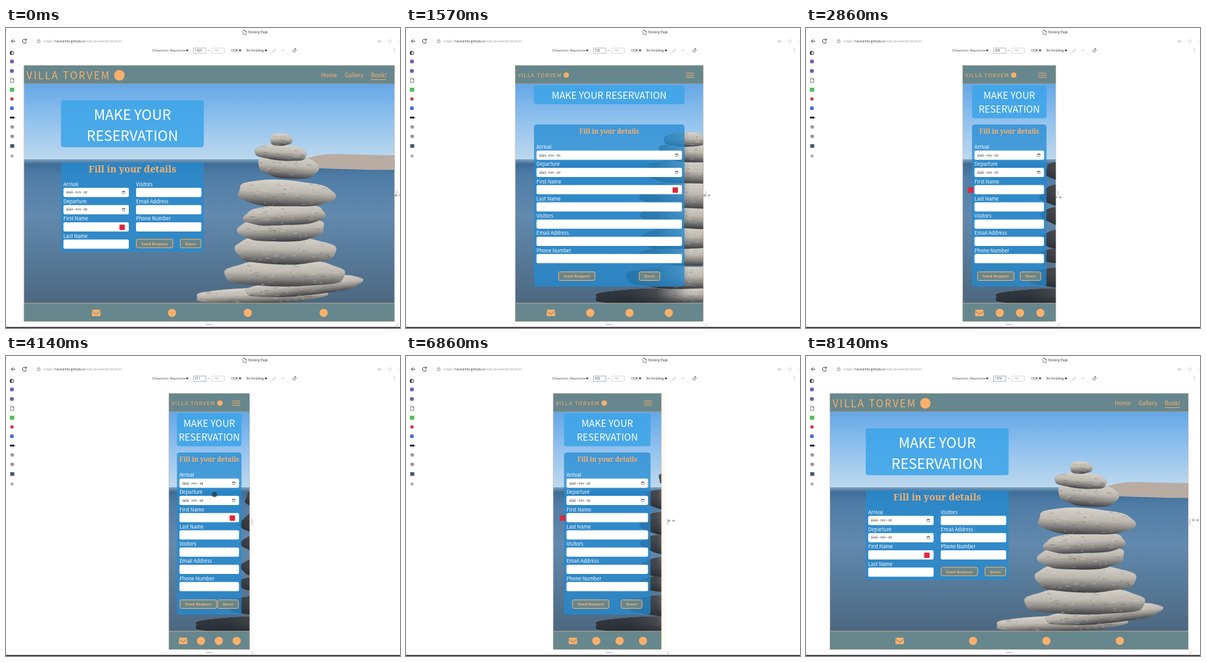
These frames come from a looping animation (600x457 px, 8280 ms). An HTML page with a canvas:

```html
<!DOCTYPE html>
<html lang="en">
<head>
<meta charset="utf-8">
<title>Booking Page</title>
<style>
  html, body { margin: 0; width: 100%; height: 100%; overflow: hidden; background: #fff; }
  canvas { display: block; width: 600px; height: 457px; }
</style>
</head>
<body>
<canvas id="stage" width="600" height="457"></canvas>
<script>
const ctx = document.getElementById('stage').getContext('2d');
const LOOP = 8280, SCALE = 0.395, TOP = 57, BOTTOM = 447;
const ORANGE = '#fdb069', SLATE = '#66878d', INK = '#333';
const SANS = '"Noto Sans CJK JP", "Noto Sans CJK", "Noto Sans", sans-serif';
const SLAB = '"Noto Serif", serif';
const UI = '"Open Sans", sans-serif';

// tick, viewport width, rendered page width, page centre, pointer x, pointer y
const KEYS = [
  [0, 1429, 1429, 309.5, 597, 255], [1, 1429, 1429, 309.5, 597, 255],
  [11, 725, 725, 309.5, 458, 255], [17, 430, 430, 309.5, 398, 257],
  [20, 359, 359, 309.5, 384, 258], [25, 311, 311, 309.5, 376, 256],
  [29, 311, 311, 309.5, 317.5, 211], [32, 311, 311, 309.5, 317.5, 211],
  [44, 311, 311, 309.5, 376, 252], [47, 311, 311, 309.5, 376, 252],
  [48, 433, 417, 306.5, 404, 251], [53, 1077, 1009, 309.3, 532, 250],
  [55, 1270, 1225, 309.3, 569, 250], [58, 1429, 1460, 309.3, 605, 250]
];

function pose(tick) {
  const i = KEYS.findIndex((k, n) => n && k[0] >= tick);
  const a = KEYS[i - 1], b = KEYS[i], f = (tick - a[0]) / (b[0] - a[0]);
  return a.map((v, n) => v + (b[n] - v) * f);
}

function rect(x, y, w, h, fill, radius = 0, stroke) {
  ctx.beginPath();
  ctx.roundRect(x, y, w, h, radius);
  if (fill) { ctx.fillStyle = fill; ctx.fill(); }
  if (stroke) { ctx.strokeStyle = stroke; ctx.stroke(); }
}
function dot(x, y, r, fill) {
  ctx.beginPath();
  ctx.arc(x, y, r, 0, 7);
  ctx.fillStyle = fill;
  ctx.fill();
}
function path(d, stroke, width = 0.8, fill) {
  const p = new Path2D(d);
  if (fill) { ctx.fillStyle = fill; ctx.fill(p); }
  if (stroke) { ctx.strokeStyle = stroke; ctx.lineWidth = width; ctx.stroke(p); ctx.lineWidth = 1; }
}
function text(str, x, y, size, color, { font = SANS, align = 'left', weight = 400, gap = 0 } = {}) {
  ctx.font = `${weight} ${size}px ${font}`;
  ctx.letterSpacing = gap + 'px';
  ctx.textAlign = align;
  ctx.fillStyle = color;
  ctx.fillText(str, x, y);
  const width = ctx.measureText(str).width;
  ctx.letterSpacing = '0px';
  return width;
}
function gradient(x0, y0, x1, y1, ...colors) {
  const g = ctx.createLinearGradient(x0, y0, x1, y1);
  colors.forEach(([at, c]) => g.addColorStop(at, c));
  return g;
}

// Stones from bottom to top: centre x, centre y, half width, half height, tilt
const WIDE_STACK = [
  [386, 408, 100, 12, -.03], [455, 394, 90, 13, -.1], [425, 374, 92, 20, 0], [424, 339, 77, 21, .02],
  [420, 307, 66, 18, -.03], [425, 285, 62, 16, -.05], [425, 252, 74, 20, .04], [430, 212, 46, 17, .08],
  [419, 190, 40, 12, .07], [419, 170, 17, 9.5, 0]
];
const NARROW_STACK = [
  [390, 408, 106, 12, -.03], [420, 380, 84, 17, 0], [430, 347, 74, 15, .02], [430, 320, 75, 16, -.03],
  [430, 288, 71, 17, .03], [425, 255, 67, 20, .02], [430, 220, 68, 17, .05],
  [430, 190, 45, 14, .06], [425, 170, 32, 11, 0]
];

function stone([x, y, rx, ry, tilt], seed, narrow) {
  const outline = new Path2D();
  for (let i = 0; i < 40; i++) {
    const a = i * Math.PI / 20, c = Math.cos(a), s = Math.sin(a);
    const bump = 1 + .035 * Math.sin(3 * a + seed * 2) + .025 * Math.sin(7 * a + seed);
    outline.lineTo(rx * bump * Math.sign(c) * Math.abs(c) ** .8, ry * bump * Math.sign(s) * Math.abs(s) ** .85);
  }
  outline.closePath();
  ctx.save();
  ctx.translate(x, y);
  ctx.rotate(tilt);
  ctx.fillStyle = gradient(0, -ry, 0, ry, [0, '#d8d3ca'], [.45, '#bdb8b0'], [.7, '#8b8884'], [1, '#3d3f43']);
  ctx.fill(outline);
  ctx.clip(outline);
  let rnd = seed * 7919 + 17;
  const random = () => (rnd = rnd * 16807 % 2147483647) / 2147483647;
  for (let i = 0; i < rx * .8; i++) {
    const px = (random() * 2 - 1) * rx, py = (random() * 2 - 1) * ry, len = 2 + random() * 6;
    rect(px, py, len, .5 + random(), random() < .5 ? 'rgba(60,60,62,.25)' : 'rgba(245,240,230,.25)');
  }
  if (narrow) {
    rect(-rx * 1.2, -ry * 1.3, rx * 2.4, ry * 2.6,
      gradient(340 - x, 0, 432 - x, 0, [0, 'rgba(27,34,44,.88)'], [.45, 'rgba(32,38,46,.78)'], [1, 'rgba(40,44,50,0)']));
  }
  ctx.restore();
}

function photo(l, w, narrow) {
  ctx.save();
  ctx.beginPath();
  ctx.rect(l, 85, w, 334);
  ctx.clip();
  rect(l, 85, w, 120, gradient(0, 85, 0, 202, [0, '#64a7e6'], [.5, '#93c3ee'], [1, '#bed9ed']));
  rect(l, 200, w, 219, gradient(0, 196, 0, 419,
    [0, '#9fc0d9'], [.05, '#3f6d96'], [.13, '#4f7ca6'], [.4, '#6289ae'], [.7, '#567998'], [1, '#4c6780']));
  if (!narrow) path('M440 205Q470 191 505 192T600 194V216Q540 217 440 212Z', null, 0, '#b9aca3');
  (narrow ? NARROW_STACK : WIDE_STACK).forEach((s, i) => stone(s, i + 1, narrow));
  ctx.restore();
}

function header(l, r, narrow) {
  rect(l, TOP, r - l, 28, SLATE);
  if (narrow) {
    text('VILLA TORVEM', l + 4, 74.6, 8, ORANGE, { gap: 1.1, weight: 500 });
    dot(l + 77.7, 71.7, 4, ORANGE);
    for (const y of [68.3, 71.4, 74.6]) rect(r - 26.5, y, 12.5, .9, ORANGE);
  } else {
    text('VILLA TORVEM', l + 4, 77.7, 15.3, ORANGE, { gap: 2.1 });
    dot(l + 145.3, 72, 8, ORANGE);
    [['Home', 112], ['Gallery', 76], ['Book!', 36]].forEach(([s, dx]) => text(s, r - dx, 75.2, 8.7, ORANGE));
    rect(r - 36, 78, 23, .8, ORANGE);
  }
  rect(l, 84.5, r - l, .7, '#b99c7d');
}

function footer(l, r) {
  rect(l, 419, r - l, 28, SLATE);
  rect(l, 418.7, r - l, .7, '#c9b49c');
  const gap = (r - l - 52) / 5;
  for (let i = 0; i < 4; i++) {
    const x = l + gap * (i + 1) + 13 * i + 7.5;
    if (i) { dot(x, 434, 6.2, ORANGE); continue; }
    rect(x - 6.5, 429, 13, 10, ORANGE, 1.5);
    path(`M${x - 6.5} 431.2L${x} 436L${x + 6.5} 431.2`, SLATE, 1);
  }
}

function field(label, x, y, w) {
  text(label, x, y, 7.5, '#fff');
  rect(x, y + 2.6, w, 14, '#fff', 2);
  if (label !== 'Arrival' && label !== 'Departure') return;
  text('åååå - mm - dd', x + 4, y + 11.3, 4.6, INK, { font: UI });
  const cx = x + w - 10, cy = y + 7.6;
  ctx.lineWidth = .6;
  rect(cx, cy, 4, 3.8, null, .5, '#555');
  rect(cx, cy, 4, 1.1, '#555');
  ctx.lineWidth = 1;
}

function button(label, x, y, w) {
  rect(x + .5, y + .5, w - 1, 13, SLATE, 2, ORANGE);
  text(label, x + w / 2, y + 9.2, 5.9, ORANGE, { font: SLAB, weight: 700, align: 'center' });
}

function form(l, w, narrow, tick) {
  const x = l + w * .1, pw = narrow ? w * .8 : 217.5, mid = x + pw / 2;
  const oneLine = narrow && pw > 185;
  const lines = oneLine ? ['MAKE YOUR RESERVATION'] : ['MAKE YOUR', 'RESERVATION'];
  const heading = narrow ? [87, oneLine ? 29 : 50.5, 108, 21.3, 14.3] : [110, 71.5, 139.7, 32, 21.4];
  const [top, height, base, pitch, size] = heading;
  rect(x, top, pw, height, 'rgba(61,165,233,.87)', 4);
  lines.forEach((s, i) => text(s, mid, base + pitch * i, size, '#fff', { align: 'center', weight: 500 }));

  rect(x, narrow ? 147 : 205, pw, narrow ? 247 : 136, 'rgba(36,140,211,.76)', 4);
  text('Fill in your details', mid, narrow ? 161 : 219.7, narrow ? 9.8 : 14.4, ORANGE,
    { font: SLAB, weight: 600, align: 'center' });

  const left = x + 3.8, fw = narrow ? pw - 7.6 : 99.5, first = narrow ? 184.2 : 240.9;
  const labels = ['Arrival', 'Departure', 'First Name', 'Last Name', 'Visitors', 'Email Address', 'Phone Number'];
  labels.forEach((s, i) => {
    const second = !narrow && i > 3;
    field(s, second ? x + 114.3 : left, first + 26.25 * (second ? i - 4 : i), fw);
  });

  const free = fw - 89;
  const sendX = narrow ? left + free / 4 : x + 114.3;
  button('Send Request', sendX, narrow ? 371 : 321.3, 56.5);
  button('Reset', narrow ? sendX + 56.5 + free / 2 : x + 181.2, narrow ? 371 : 321.3, 32.5);

  // The password badge trails behind while the page is being resized
  const late = narrow && (tick > 17 && tick < 25 || tick > 47);
  const badge = late ? left - 10 : left + fw - 14.3;
  rect(badge, first + 58.6, 8.2, 8.2, '#e3263c', 1);
}

function browser(width, tick) {
  rect(0, 0, 600, 457, '#fff');
  const ui = (s, x, y, size, color = INK) => text(s, x, y, size, color, { font: UI });
  path('M361 3.5h3l2 2v4.5h-5zM364 3.5v2h2', '#555', .7);
  ui('Booking Page', 369, 8, 4.7);
  path('M14 20H8m2.7-2.8L8 20l2.7 2.8', '#333', .9);
  path('M31 18.3a3.2 3.2 0 1 0 .5 2.6M31.3 16.3v2.3h-2.3', '#333', .9);
  path('M47.7 19.3h4v3.2h-4zM48.5 19.3v-1.2a1.2 1.2 0 0 1 2.4 0v1.2', '#777', .6);
  let x = 58;
  for (const [s, c] of [['https://', '#999'], ['larsvento.github.io', '#333'], ['/villa-torvem/book.html', '#999']])
    x += ui(s, x, 21.8, 5.1, c);
  ui('A»', 566.5, 22, 5, '#888');
  path('M584.500 17.300l.9 1.900 2 .3-1.500 1.400.4 2-1.800-1-1.800 1 .4-2-1.500-1.400 2-.3z', '#bbb', .5);
  ui('›', 597, 22, 6, '#999');

  ui('Dimensions: Responsive', 222.5, 36, 4.5, '#555');
  ui('100%', 342, 36, 4.5);
  ui('No throttling', 366, 36, 4.5);
  for (const ax of [274, 354.5, 394]) path(`M${ax} 33h3.800l-1.900 3z`, null, 0, '#222');
  ctx.lineWidth = .7;
  rect(285.5, 30.5, 19, 8, '#fff', 0, tick > 25 ? '#6fa5ad' : '#aaa');
  rect(313.5, 30.5, 19, 8, '#fff', 0, '#ccc');
  ctx.lineWidth = 1;
  ui(String(Math.round(width)), 287.5, 36.2, 4.6);
  ui('×', 307.5, 36, 4.5, '#777');
  ui('986', 316, 36.2, 4.6, '#bbb');
  path('M406 37l1-2.500 3-3 1.300 1.300-3 3z', '#aaa', .7);
  path('M418.500 34.500q3-3 6 0M421.500 33v3.500', '#ccc', .7);
  path('M436.500 35l3-3.500 2.500 2-3 3.800zM440 31l2 1.500', '#555', .8);
  for (const y of [31.8, 34, 36.2]) dot(591.500, y, .5, '#777');

  rect(6.5, 35.5, 5, 5, '#fff', 1, '#333');
  rect(6.5, 35.5, 2, 5, '#333');
  dot(9, 51, 3, '#7459b5');
  dot(9, 65.500, 3, '#7459b5');
  path('M7 76.500h3l2 2v4.500h-5zM10 76.500v2h2', '#555', .7);
  rect(6, 91, 6.500, 6, '#4fbb58');
  dot(9, 108, 2.600, '#cf3540');
  dot(9, 122.300, 3, '#4d70d6');
  rect(6, 135, 7, 3, '#333');
  dot(9.500, 150.700, 2.800, '#999');
  dot(9.500, 165, 2.800, '#999');
  rect(6.500, 177, 6, 5.500, '#48546d');
  path('M6.500 195h5.500M9.250 192.200v5.600', '#444', .7);
  rect(0, 455.5, 600, 1.5, '#1d1f22');
}

function pointer(x, y, edge) {
  if (x < edge - 4) {
    dot(x, y, 4, 'rgba(45,55,65,.75)');
    return;
  }
  path(`M${x - 4.500} ${y}h9M${x - 3} ${y - 1.700}l-1.700 1.700 1.700 1.700M${x + 3} ${y - 1.700}l1.700 1.700-1.700 1.700`, '#555', .7);
  rect(x - .9, y - 2, 1.8, 4, '#fff');
}

function draw(time) {
  const tick = Math.floor((time % LOOP) * .007 + .05);
  const [, width, pageWidth, mid, px, py] = pose(tick);
  const edge = 309.5 + width * SCALE / 2;
  const w = pageWidth * SCALE, l = mid - w / 2, r = l + w;
  const narrow = pageWidth <= 768;

  browser(width, tick);
  if (narrow && edge > r + 2) rect(r, TOP, edge - r, 390, '#fffaf3');
  photo(l, w, narrow);
  header(l, r, narrow);
  form(l, w, narrow, tick);
  footer(l, r);
  ctx.lineWidth = .6;
  rect(l, TOP, w, BOTTOM - TOP, null, 0, 'rgba(190,150,110,.7)');
  ctx.lineWidth = 1;

  rect(edge + 2, 247.5, 3, 10, '#e2e2e4');
  rect(304.5, 450.5, 10, 2.5, '#d5d5d7');
  path(`M${edge + 2} 454l4-4M${edge + 4.300} 454l1.700-1.700`, '#aaa', .7);
  pointer(px, py, edge);
}

function loop(now) {
  draw(now);
  requestAnimationFrame(loop);
}
requestAnimationFrame(loop);
</script>
</body>
</html>
```
